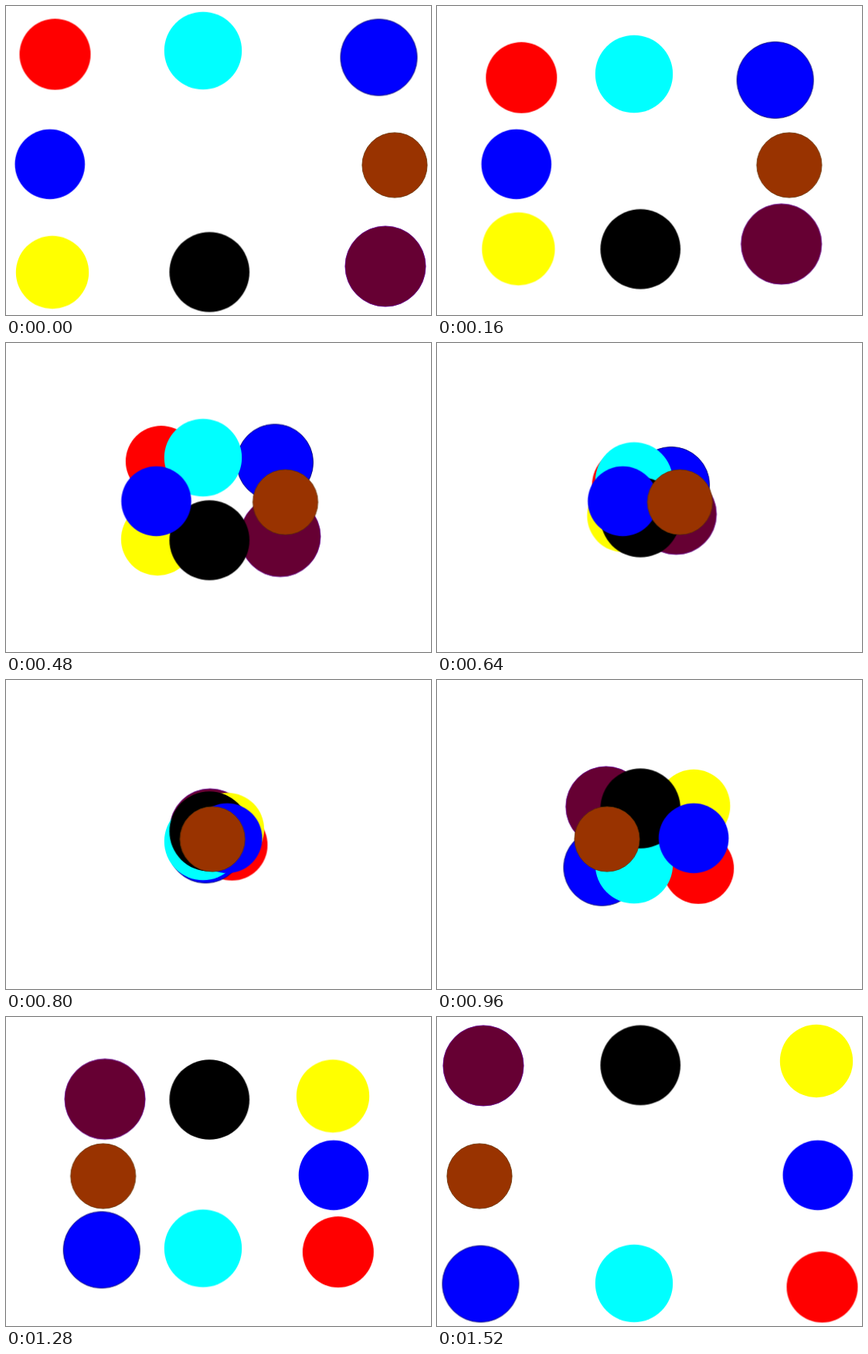
These frames come from a looping animation (550 by 400 pixels, 1.6 s). An HTML page:

```html
<!DOCTYPE html>
<html lang="en">
<head>
<meta charset="utf-8">
<title>Crossing circles</title>
<style>
  html, body { margin: 0; width: 100%; height: 100%; overflow: hidden; background: #fff; }
  svg { display: block; width: 550px; height: 400px; }
  circle {
    stroke-width: .8;
    transform: translate(var(--x0), var(--y0));
    animation: cross 1.6s steps(20, jump-none) infinite;
  }
  @keyframes cross {
    from { transform: translate(var(--x0), var(--y0)); }
    to   { transform: translate(var(--x1), var(--y1)); }
  }
  .red    { --x0: 63.5px;  --y0: 62.5px;  --x1: 498.5px; --y1: 349.5px; fill: #f00; }
  .navy   { --x0: 482.5px; --y0: 66.5px;  --x1: 56.5px;  --y1: 345.5px; fill: #00f; stroke: #006; }
  .plum   { --x0: 491px;   --y0: 337px;   --x1: 60px;    --y1: 63px;    fill: #603; stroke: #609; }
  .yellow { --x0: 60px;    --y0: 344.7px; --x1: 491px;   --y1: 57px;    fill: #ff0; }
  .cyan   { --x0: 255px;   --y0: 57.8px;  --x1: 255px;   --y1: 344.8px; fill: #0ff; }
  .black  { --x0: 263.3px; --y0: 344.4px; --x1: 263.3px; --y1: 62.4px;  fill: #000; }
  .blue   { --x0: 56.8px;  --y0: 204.8px; --x1: 492.8px; --y1: 204.8px; fill: #00f; }
  .brown  { --x0: 503px;   --y0: 206px;   --x1: 55px;    --y1: 206px;   fill: #930; stroke: #630; }
</style>
</head>
<body>
<svg viewBox="0 0 550 400">
  <circle class="red" r="46"/>
  <circle class="navy" r="49.6"/>
  <circle class="plum" r="52.1"/>
  <circle class="yellow" r="47.2"/>
  <circle class="cyan" r="50.2"/>
  <circle class="black" r="51.8"/>
  <circle class="blue" r="45.3"/>
  <circle class="brown" r="42.1"/>
</svg>
</body>
</html>
```
